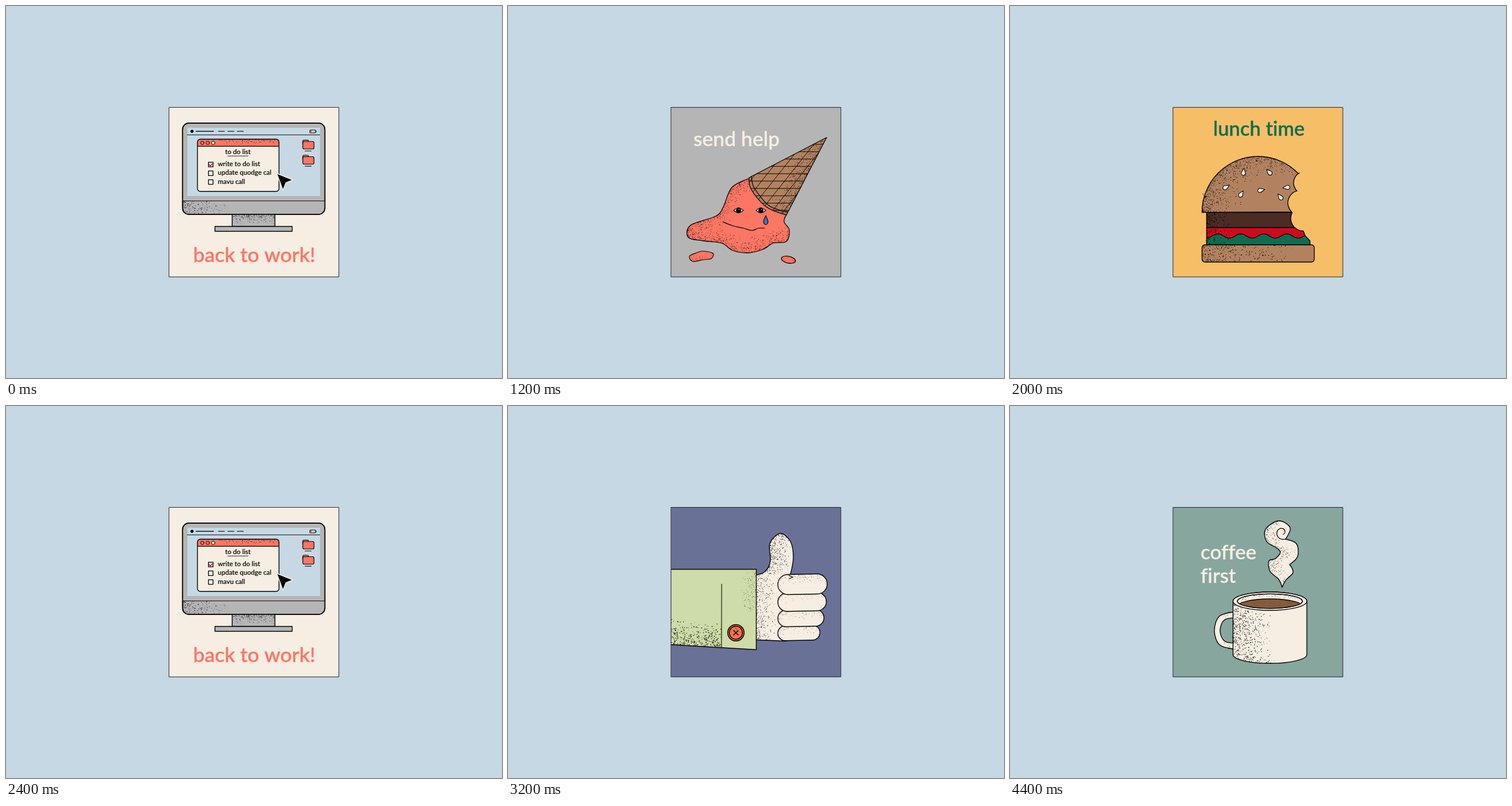
An HTML page with a canvas that plays this animation: 864x648 px, repeating every 4800 ms.

```html
<!DOCTYPE html>
<html lang="en">
<head>
<meta charset="utf-8">
<title>A working day</title>
<style>
  html, body { margin: 0; width: 100%; height: 100%; overflow: hidden; background: #c5d8e3; }
  canvas { display: block; }
</style>
</head>
<body>
<canvas id="stage" width="864" height="648"></canvas>
<script>
const W = 864, H = 648, SLOT = 400;
const SKY = '#c5d8e3', CREAM = '#f7eee3', GREY = '#b5b5b5', CORAL = '#fc7664', GREEN = '#cddca8',
  AMBER = '#f7be68', BROWN = '#b28260', TEAL = '#87a69e', NAVY = '#6a7196', INK = '#000',
  FOREST = '#0c6e4f', RED = '#d0091d';
const BOX = { x: 284.3, y: 176.6, w: 295.5, h: 295.3 };
const RIGHT = 0, DOWN = 90, LEFT = 180, UP = 270;
const rad = degrees => degrees * Math.PI / 180;
let g, seed;

function layer(options) {
  const canvas = document.createElement('canvas');
  canvas.width = W;
  canvas.height = H;
  return canvas.getContext('2d', options);
}
const mask = layer({ willReadFrequently: true });

function random() {
  seed = (seed * 1664525 + 1013904223) >>> 0;
  return seed / 4294967296;
}

// Smooth path through "x,y" points; a point marked "!" is a corner.
function curve(text, closed = true) {
  const points = text.split(' ').map(p => [...p.replace('!', '').split(',').map(Number), p.endsWith('!')]);
  const n = points.length, path = new Path2D();
  const at = i => points[closed ? (i + n) % n : Math.max(0, Math.min(n - 1, i))];
  const slope = (i, axis) => at(i)[2] ? 0 : (at(i + 1)[axis] - at(i - 1)[axis]) / 6;
  path.moveTo(at(0)[0], at(0)[1]);
  for (let i = 0; i < (closed ? n : n - 1); i++) {
    const [ax, ay] = at(i), [bx, by] = at(i + 1);
    path.bezierCurveTo(ax + slope(i, 0), ay + slope(i, 1), bx - slope(i + 1, 0), by - slope(i + 1, 1), bx, by);
  }
  if (closed) path.closePath();
  return path;
}
const poly = (text, closed) => curve(text.split(' ').join('! ') + '!', closed);

function box(x, y, w, h, r = 0) {
  const path = new Path2D();
  path.roundRect(x, y, w, h, r);
  return path;
}

function oval(x, y, rx, ry = rx, turn = 0) {
  const path = new Path2D();
  path.ellipse(x, y, rx, ry, rad(turn), 0, 2 * Math.PI);
  return path;
}

function capsule([ax, ay], [bx, by], r) {
  const path = new Path2D(), a = Math.atan2(by - ay, bx - ax), q = Math.PI / 2;
  path.arc(bx, by, r, a - q, a + q);
  path.arc(ax, ay, r, a + q, a + 3 * q);
  path.closePath();
  return path;
}

function plot(point, from, to, steps = 80) {
  const path = new Path2D();
  for (let i = 0; i <= steps; i++) path.lineTo(...point(from + (to - from) * i / steps));
  return path;
}

function turned(path, degrees, x = 0, y = 0) {
  const result = new Path2D();
  result.addPath(path, new DOMMatrix().translate(x, y).rotate(degrees));
  return result;
}

function paint(path, fill, width = 1.3, ink = INK) {
  if (fill) { g.fillStyle = fill; g.fill(path); }
  if (width) { g.strokeStyle = ink; g.lineWidth = width; g.stroke(path); }
  return path;
}
const line = (path, width, ink) => paint(path, null, width, ink);

function clipped(path, draw) {
  g.save();
  g.clip(path);
  draw();
  g.restore();
}

// Stipples the side of a shape that faces the given direction.
function shade(path, direction, depth, density = 0.3, size = 0.55, ink = INK) {
  mask.clearRect(0, 0, W, H);
  mask.fill(path);
  const { data } = mask.getImageData(0, 0, W, H);
  const inside = (x, y) => data[((y | 0) * W + (x | 0)) * 4 + 3] > 127;
  const dx = Math.cos(rad(direction)), dy = Math.sin(rad(direction));
  g.fillStyle = ink;
  for (let i = 0; i < BOX.w * BOX.h * density; i++) {
    const x = BOX.x + random() * BOX.w, y = BOX.y + random() * BOX.h;
    const reach = depth * random() ** 1.7, r = size * (0.55 + random() * 0.6);
    if (!inside(x, y) || inside(x + dx * reach, y + dy * reach)) continue;
    g.beginPath();
    g.arc(x, y, r, 0, 7);
    g.fill();
  }
}

function label(text, x, y, size, color = INK, align = 'left', weight = 500) {
  g.font = `${weight} ${size}px Lato, sans-serif`;
  g.letterSpacing = '0.02px';
  g.textAlign = align;
  g.fillStyle = g.strokeStyle = color;
  g.lineWidth = size * 0.014;
  g.fillText(text, x, y);
  g.strokeText(text, x, y);
}

function button(x, y, r, fill) {
  const disc = paint(oval(x, y, r), fill, 1.5);
  line(oval(x, y, r * 0.8), 1.5);
  shade(disc, UP, r, 0.25, 0.4);
  for (const turn of [45, 135]) line(turned(box(-r * 0.4, 0, r * 0.8, 0), turn, x, y), 1.5);
}

function folder(y) {
  paint(box(517, y, 10, 8, 2), CORAL, 1.2);
  paint(box(517, y + 2.5, 19.5, 13, 2.5), CORAL, 1.2);
  line(box(521, y + 19, 11, 0), 0.7);
}

function work() {
  const body = paint(box(307.5, 204, 248, 159, 11), GREY, 1.5);
  clipped(body, () => {
    shade(box(300, 340, 256, 28), LEFT, 92, 0.28);
    line(box(300, 339.5, 260, 0), 0.7);
  });
  line(body, 1.5);
  paint(box(316, 212, 231, 119), SKY, 0);
  line(box(316, 224.5, 231, 0), 0.7);
  paint(oval(324, 218.2, 2.7), INK, 0);
  line(box(331, 218.3, 31, 0), 1);
  for (let x = 370; x < 410; x += 16.5) line(box(x, 218.3, 11, 0), 0.7);
  paint(box(529.5, 216, 9.5, 5, 1), SKY, 1.2);
  paint(box(530.3, 216.8, 2.5, 3.4), CORAL, 0);
  line(box(540.5, 217.5, 0, 2), 0.6);
  folder(233.5);
  folder(260);

  const pane = paint(box(333.5, 232, 142, 91, 5), CREAM, 0);
  clipped(pane, () => paint(box(333, 231, 143, 13.3), CORAL));
  shade(box(372, 232.5, 103, 11), UP, 9, 0.4, 0.5);
  line(pane, 1.4);
  for (let i = 0; i < 3; i++) paint(oval(342 + 9.5 * i, 238.4, 3), i < 2 ? CORAL : CREAM, 1);
  label('to do list', 404, 258, 11.5, INK, 'center');
  line(box(386, 261.3, 36, 0), 0.5);
  ['write to do list', 'update quodge cal', 'mavu call'].forEach((task, i) => {
    line(box(352.6, 272.2 + 15.2 * i, 8, 8));
    label(task, 369, 278.8 + 15.4 * i, 11.5);
  });
  line(poly('353.5,276 356,278.5 361,273.5', false), 1.5, RED);
  paint(poly('471.5,291.5 500,303 487.5,308 482.5,321'), INK, 1.5, CREAM);

  const neck = paint(box(394, 363, 74.5, 21), GREY, 1.4);
  shade(neck, UP, 17, 0.4, 0.5);
  paint(box(364, 384, 134.5, 8.5), GREY, 1.4);
  label('back to work!', 326, 446, 35.5, CORAL);
}

function thumb() {
  const palm = paint(curve('425,296! 447,289 457,270 456,240 474,222 492,236 497,264 492,293! 530,310! 530,400! 482,409.5! 425,407!'), CREAM, 1.4);
  shade(palm, LEFT, 42, 0.3);
  for (let i = 3; i >= 0; i--) {
    const r = 17.5 - 1.5 * i, y = 310 + 32 * i - 1.25 * i * i, tip = 556 - 1.4 * i * i;
    const finger = paint(capsule([470 + r, y + 1], [tip - r, y], r), CREAM, 1.4);
    shade(finger, UP, 18, 0.2, 0.4);
  }
  line(poly('489,295 496,298 490,301', false));

  const sleeve = paint(poly('270,284.5 432.5,284.5 432.5,424.5 270,415'), GREEN, 1.4);
  clipped(box(280, 350, 92, 80), () => shade(sleeve, DOWN, 48, 0.24, 0.75));
  shade(box(400, 287, 32, 70), RIGHT, 28, 0.2, 0.45);
  line(box(372, 310, 0, 111), 0.65);
  button(397, 395, 14.3, '#f4734a');
}

function eye(x) {
  paint(curve(`${x - 8.5},356! ${x},351.5 ${x + 8.5},356! ${x},360.5`), CREAM, 1.1);
  paint(oval(x, 356, 4.4), INK, 0);
  paint(oval(x + 1, 354.5, 0.8), CREAM, 0);
}

function melted() {
  label('send help', 323, 244, 35.5, CREAM);
  const blob = paint(curve('421,300! 390,316 375,350 362,366 318,382 314,403 340,409 372,413 392,426 418,430 444,424 462,413 485,410 490,390 481,376 485,364!'), CORAL);
  shade(blob, DOWN, 30, 0.3, 0.5);
  shade(blob, LEFT + 35, 26, 0.3, 0.5);
  line(curve('374,376 392,383 410,387 425,391 436,387 447,387', false), 1.2);
  eye(401.5);
  eye(440.5);
  paint(curve('449,365! 453,376 449,381 445,376'), '#3e6fc0', 1.1);

  const cone = paint(curve('555,229! 420,299! 424,320 450,350 485,364!'), BROWN);
  clipped(cone, () => {
    for (let i = 0; i < 11; i++) {
      line(box(410, 241 + 12.8 * i, 150, 0), 0.6);
      line(poly(`${350 + 20 * i},370 ${463 + 20 * i},228`), 0.6);
    }
  });
  shade(cone, 28, 36, 0.3, 0.5);
  line(curve('424,297 429,317 455,348 487,359', false));

  for (const drop of [curve('316,436 328,430 340,427 357,431 354,440 340,442 322,445'), oval(488.5, 442, 12.5, 6, 12)]) {
    paint(drop, CORAL, 1.2);
    shade(drop, DOWN, 12, 0.25, 0.4);
  }
}

function grain(x, y, degrees) {
  paint(turned(curve('0,-7! 3.6,2 0,5.5 -3.6,2'), degrees, x, y), CREAM, 1.1);
}

function lunch() {
  label('lunch time', 354, 226, 34.5, FOREST);
  const stack = new Path2D();
  stack.moveTo(342.5, 359.5);
  stack.lineTo(490, 359.5);
  stack.arc(511, 370, 22, -2.66, Math.PI / 2, true);
  for (const [x, y] of [[514, 400], [522.5, 409], [522.5, 416], [342.5, 416]]) stack.lineTo(x, y);
  stack.closePath();
  clipped(stack, () => {
    paint(box(340, 359, 190, 27), '#4a2c22', 1.4);
    paint(box(340, 386, 190, 30), RED, 1.4);
    const lettuce = plot(x => [x, 400.7 - 3.7 * Math.cos((x - 362) / 20 * Math.PI)], 338, 528);
    lettuce.lineTo(528, 420);
    lettuce.lineTo(338, 420);
    paint(lettuce, FOREST);
  });
  shade(stack, LEFT, 40, 0.18, 0.75);
  line(stack, 1.4);

  const bun = new Path2D();
  bun.arc(432, 359.5, 97.5, Math.PI, -0.76);
  bun.arc(514, 308, 20, -2.1, 2.35, true);
  bun.arc(506, 343, 22, -1.85, 2.35, true);
  bun.closePath();
  paint(bun, BROWN, 1.4);
  shade(bun, LEFT + 40, 52, 0.28);
  shade(box(335, 320, 75, 39), LEFT, 75, 0.09, 0.6);
  for (let i = 0; i < 4; i++) {
    const a = rad(161 - 47.5 * i);
    grain(429 + 56 * Math.cos(a), 330 - 44 * Math.sin(a), 60 - 52 * i);
  }
  grain(402.5, 328, 32);
  grain(437, 321, 78);
  grain(471, 333, -38);

  const base = paint(box(334.5, 416, 195.5, 30, 5), BROWN, 1.4);
  shade(base, LEFT, 160, 0.14, 0.7);
}

function wave() {
  const fingers = [
    { base: [406, 268], tip: [417, 228] },
    { base: [440, 275], tip: [472, 235] },
    { base: [455, 283], tip: [495, 253] },
    { base: [465, 296], tip: [505, 284] },
    { base: [445, 331], tip: [500, 318] }
  ];
  const limbs = fingers.map(({ base, tip }, i) => capsule(base, tip, 14.2 - 0.5 * i));
  const palm = curve('378,279! 396,259 424,258 443,262 465,290 465,318 448,342! 418,349!');
  const hand = [...limbs, palm];
  hand.forEach(part => line(part, 2.8));
  hand.forEach(part => paint(part, CREAM, 0));
  limbs.forEach((limb, i) => shade(limb, i ? 255 : LEFT + 10, 24, 0.24, 0.45));
  for (let i = 1; i < 4; i++) {
    const a = fingers[i], b = fingers[i + 1];
    const mix = (axis, t) => (a.tip[axis] + b.tip[axis]) / 2 * (1 - t) + (a.base[axis] + b.base[axis]) / 2 * t;
    line(poly(`${mix(0, 0.08)},${mix(1, 0.08)} ${mix(0, 0.75)},${mix(1, 0.75)}`, false));
  }
  shade(curve('425,265! 430,285 412,306! 408,280'), RIGHT, 20, 0.25, 0.5);
  shade(curve('445,291! 442,312 450,334! 466,318'), LEFT, 20, 0.25, 0.45);
  line(curve('425,265 429,284 414,305', false));
  line(curve('445,291 443,312 450,332', false));

  const sleeve = paint(poly('270,328.2 374,267 430,361 270,443.2'), AMBER, 1.4);
  shade(sleeve, 240, 46, 0.24, 0.7);
  shade(poly('360,337 387,382 345,400'), 330, 28, 0.25, 0.5);
  line(poly('343,308 387,382', false));
  button(394, 355.5, 11.3, '#ee6150');
  for (const mark of ['376,203 365,212 366,227', '385,206 375,217 376,233', '531,319 533,335 523,349', '542,325 543,337 535,347'])
    line(curve(mark, false));
  label('i’m back!', 413, 448, 36.5, CORAL);
}

function nap() {
  for (let i = 0; i < 3; i++) {
    g.save();
    g.translate(334.5 + 15.8 * i, i === 1 ? 207.5 : 216);
    g.rotate(rad(16 * (i - 1)));
    label('Z', 0, 6.5, i ? 17 : 21, INK, 'center', 900);
    g.restore();
  }

  const back = paint(turned(box(428, -125, 224, 66, [34, 34, 8, 8]), 45), BROWN);
  shade(back, 315, 36, 0.25, 0.5);
  paint(oval(384, 240, 5, 6, -25), CREAM, 1.2);
  paint(curve('337,260! 346,236 366,229.5 384,238 397,262 385,285! 360,265!'), INK, 1);
  paint(curve('345,264! 358,254 366,238! 370,252 377,262! 374,289!'), CREAM, 1);
  line(curve('352,263 356,265 358,260', false), 1.1);
  line(curve('363,254 368,254 371,249', false), 1.1);
  line(poly('364,257 366,263 369,260', false), 1.1);
  paint(oval(372.5, 267, 2.8), INK, 0);

  paint(poly('376,286 402,268 449,308 436,348'), '#a5dcf5', 1.2);
  line(curve('402,268 426,280 446,304', false), 1.2);
  paint(oval(398, 284, 11, 13, 25), INK, 0);
  paint(curve('428,344! 462,320 500,335 524,388! 511,396! 492,374 473,362! 508,407! 507,424!'), INK, 1);

  const farShoe = paint(capsule([513, 397], [541, 396], 9), CREAM, 1.2);
  shade(farShoe, DOWN, 24, 0.25, 0.4);
  paint(turned(box(-9.5, -22, 19, 44, [9.5, 9.5, 0, 0]), 36, 524, 411), CREAM, 1.2);

  const front = paint(turned(box(421, -59.5, 241, 59.5, [14, 14, 42, 42]), 45), BROWN);
  shade(front, 135, 46, 0.28);

  const mustard = turned(plot(s => [462 + 8.6 * s + 5 * Math.sin(2 * s), -77 + 21 * Math.cos(s)], 0, 6 * Math.PI, 160), 45);
  line(mustard, 15);
  line(mustard, 12.4, AMBER);
  for (let i = 0; i < 420; i++) {
    const s = random() * 6 * Math.PI;
    const u = 462 + 8.6 * s + 5 * Math.sin(2 * s) + (random() - 0.5) * 8;
    const v = -77 + 21 * Math.cos(s) + (random() - 0.5) * 8;
    paint(turned(oval(u, v, 0.4), 45), INK, 0);
  }
}

function coffee() {
  label('coffee', 332, 267, 35, CREAM);
  label('first', 332, 308, 35, CREAM);
  const handle = curve('392,358.5! 365,366 356,391 365,416 392,423.5! 392,413! 373,409 366,391 373,373 392,369!');
  paint(handle, CREAM, 1.4);
  shade(box(365, 358, 24, 12), RIGHT, 26, 0.2, 0.45);
  shade(box(365, 412, 24, 12), RIGHT, 26, 0.2, 0.45);

  const mug = new Path2D();
  mug.ellipse(452.8, 340, 64.3, 16, 0, Math.PI, 0);
  mug.ellipse(452.8, 433, 64.3, 15.3, 0, 0, Math.PI);
  mug.closePath();
  paint(mug, CREAM, 1.4);
  shade(mug, LEFT, 68, 0.22, 0.7);
  paint(oval(452.8, 340, 64.3, 16), CREAM, 1.4);
  const well = paint(oval(452.8, 340, 56.7, 12.7), CREAM);
  shade(well, 290, 14, 0.25, 0.4);
  clipped(well, () => {
    const brew = paint(oval(452.8, 349.3, 57, 13.3), '#815a3d');
    shade(brew, LEFT + 30, 40, 0.15, 0.4, BROWN);
  });
  line(well);

  const steam = paint(curve('474,316! 468,302 453,288 451,270 462,266 471,255 464,247 447,236 445,215 468,200 488,212 480,232! 499,240 501,262 487,276! 493,290 480,304'), CREAM, 1.4);
  shade(steam, LEFT, 30, 0.28, 0.5);
  line(plot(t => {
    const r = 13.4 * Math.exp(-1.2 * t), a = rad(63 + 357 * t);
    return [474 + r * Math.cos(a), 220 + r * Math.sin(a)];
  }, 0, 1));
}

function card(color, draw) {
  g = layer();
  seed = 20 + draw.name.length;
  g.lineCap = g.lineJoin = 'round';
  const frame = box(BOX.x, BOX.y, BOX.w, BOX.h);
  paint(frame, color, 0);
  clipped(frame, draw);
  line(frame, 1, '#222');
  return g.canvas;
}

const cards = {
  work: card(CREAM, work),
  thumb: card(NAVY, thumb),
  melted: card(GREY, melted),
  lunch: card(AMBER, lunch),
  wave: card(GREEN, wave),
  nap: card(CORAL, nap),
  coffee: card(TEAL, coffee)
};
const order = ['work', 'wave', 'thumb', 'melted', 'coffee', 'lunch',
  'work', 'wave', 'thumb', 'nap', 'melted', 'coffee'];

const stage = document.getElementById('stage').getContext('2d');
const start = performance.now();

function tick() {
  const slot = Math.floor((performance.now() - start) / SLOT) % order.length;
  stage.fillStyle = SKY;
  stage.fillRect(0, 0, W, H);
  stage.drawImage(cards[order[slot]], 0, 0);
  requestAnimationFrame(tick);
}
tick();
</script>
</body>
</html>
```
